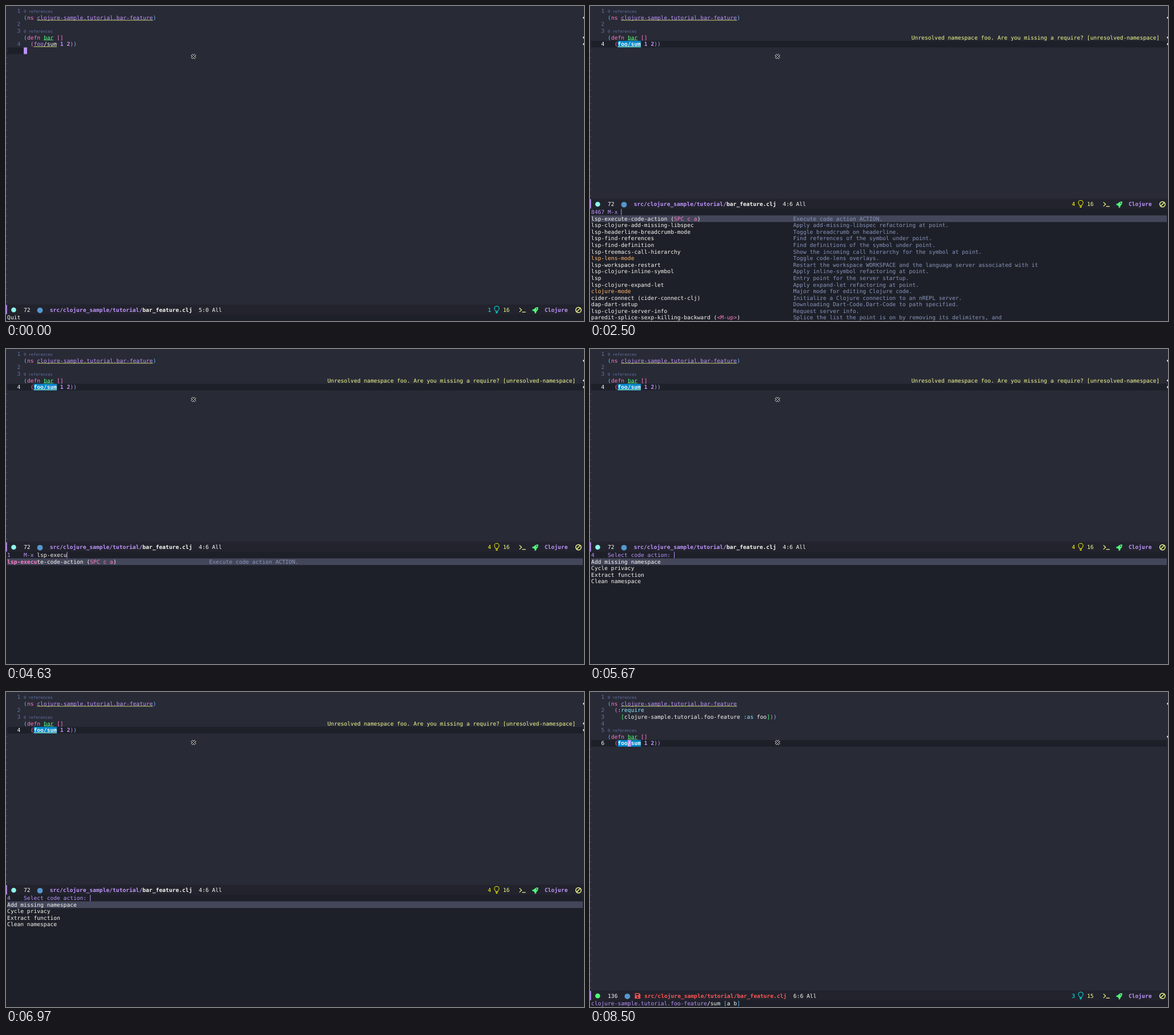
Animation, 1012 px wide and 553 px high, one loop 9060 ms. Source, as an HTML page:

```html
<!DOCTYPE html>
<html lang="en">
<head>
<meta charset="utf-8">
<title>Editor code action</title>
<style>
  html, body { margin: 0; width: 100%; height: 100%; overflow: hidden; background: #282a36; }
  svg { display: block; width: 1012px; height: 553px; }
  text {
    font: 9.63px "DejaVu Sans Mono", monospace;
    white-space: pre;
    text-rendering: geometricPrecision;
    font-variant-ligatures: none;
  }
  .bold { font-weight: bold; }
  .lens { font-size: 7.004px; }
</style>
</head>
<body>
<svg id="stage" viewBox="0 0 1012 553"></svg>
<script>
const LOOP = 9060, CW = 5.798, LH = 11.596, LEFT = 2.1, BASE = 8.96;
const BAR_H = 17.4, MINI = 356;

// One letter per colour; the upper-case letter is the bold version.
const INK = {
  w: '#f8f8f2', v: '#bd93f9', k: '#ff79c6', g: '#50fa7b', c: '#8be9fd', b: '#61bfff',
  y: '#f1fa8c', o: '#ffb86c', r: '#ff5555', d: '#8995bb', n: '#6272a4'
};
const DARK = '#1e2029', SELECT = '#44475a';

const colX = col => LEFT + col * CW;
const rowY = row => 3.16 + row * LH;
const miniY = row => MINI + row * LH;
const safe = s => s.replace(/&/g, '&amp;').replace(/</g, '&lt;');
const rect = (x, y, w, h, fill) => `<rect x="${x}" y="${y}" width="${w}" height="${h}" fill="${fill}"/>`;
const disc = (x, y, r, fill) => `<circle cx="${x}" cy="${y}" r="${r}" fill="${fill}"/>`;
const stroke = (d, color, w = 1) => `<path d="${d}" fill="none" stroke="${color}" stroke-width="${w}"/>`;
const label = (x, y, s, fill, cls = '') => `<text x="${x}" y="${y}" fill="${fill}" class="${cls}">${safe(s)}</text>`;

// Runs alternate between an ink letter and its text.
function runs(x, y, ...parts) {
  let out = '';
  for (let i = 0; i < parts.length; i += 2) {
    const [ink, s] = [parts[i], parts[i + 1]];
    const low = ink.toLowerCase();
    out += label(x, y, s, INK[low], ink === low ? '' : 'bold');
    x += s.length * CW;
  }
  return out;
}
const code = (row, ...parts) => runs(colX(5), rowY(row) + BASE, ...parts);
const underline = (row, col, n, ink) => rect(colX(col + 5), rowY(row) + BASE + 0.9, n * CW, 0.8, INK[ink]);
const lens = row => label(colX(5), rowY(row) + BASE, '0 references', INK.n, 'lens');

function buffer(s) {
  const last = s.edited ? 7 : 5, defn = last - 1;
  const [row, col] = s.cursor;
  const y = rowY(row);
  const end = s.list ? 28 : 44;
  let out = rect(LEFT, y, s.idle ? 1008 : 5 * CW, LH, DARK);

  if (s.idle) out += rect(colX(8), rowY(last), 7 * CW, LH, '#0189cc');
  if (!s.list) out += rect(colX(col + 5), y, CW, LH, INK.v);

  for (let r = last + 1; r <= end; r++) out += rect(0, rowY(r) + 5.3, 2.1, 0.8, '#565761');

  const numbered = s.edited ? [0, 2, 3, 4, 5, 7] : [0, 2, 3, 5];
  numbered.forEach((r, i) => {
    out += runs(colX(3), rowY(r) + BASE, r === row ? 'w' : 'n', String(i + 1));
  });

  out += lens(0) + lens(defn - 1);
  out += code(1, 'b', '(', 'k', 'ns ', 'v', 'clojure-sample.tutorial.bar-feature', 'b', s.edited ? '' : ')');
  out += underline(1, 4, 35, 'y');
  if (s.edited) {
    out += s.plain
      ? code(2, 'w', '  (:require') + code(3, 'w', '    [clojure-sample.tutorial.foo-feature :as foo]))')
      : code(2, 'k', '  (', 'c', ':require') +
        code(3, 'g', '    [', 'w', 'clojure-sample.tutorial.foo-feature ', 'c', ':as', 'w', ' foo', 'g', ']', 'k', ')', 'b', ')');
  }
  out += code(defn, 'b', '(', 'k', 'defn ', 'g', 'bar', 'k', ' []') + underline(defn, 6, 3, 'g');
  const call = s.idle ? ['W', 'foo/sum'] : ['v', 'foo', 'w', '/sum'];
  out += code(last, 'k', '  (', ...call, 'V', ' 1 2', 'k', ')', 'b', ')');

  const unresolved = !s.edited || s.plain;
  if (unresolved) out += underline(last, 3, 7, 'y');
  if (unresolved && s.idle) {
    out += runs(562.8, rowY(defn) + BASE, 'y', 'Unresolved namespace foo. Are you missing a require? [unresolved-namespace]');
  }
  for (const r of [1, defn, ...(unresolved ? [last] : [])]) {
    const m = rowY(r) + 5.8;
    out += `<path d="M1012 ${m - 2.4}L1009.8 ${m}L1012 ${m + 2.4}z" fill="#f8f9c8"/>`;
  }
  return out;
}

function pointer() {
  const cross = 'M324.9 85.2L331.7 92M331.7 85.2L324.9 92';
  return stroke(cross, '#f8f8f2', 3.4) + stroke(cross, '#15161c', 1.9);
}

function modeline(s) {
  const top = (s.list ? MINI : miniY(16)) - BAR_H;
  const y = top + 12.8, mid = top + 9.4;
  const saved = s.edited && !s.plain;
  const few = saved || !s.idle && !s.plain;
  const tone = few ? '#00ffff' : '#ffff00';
  const count = saved ? '3' : few ? '1' : '4';
  const shift = saved ? 18.5 : 0;

  let out = rect(0, top, 1012, 553 - top, DARK) + rect(0, top, 1012, BAR_H, '#22232d');
  out += rect(0, top + 0.6, 1.7, BAR_H - 1, INK.v);
  out += disc(13.5, mid, 4.3, saved ? INK.g : '#8ff5ea');
  out += runs(colX(5), y, 'w', saved ? '136' : '72');
  out += disc(saved ? 65.4 : 59.5, mid + 0.8, 4.9, '#5597cf');
  if (saved) {
    out += `<path d="M78.6 ${mid - 4.7}h7.6l2 2v7.4h-9.6z" fill="${INK.r}"/>`;
    out += rect(80, mid - 3.5, 5.2, 2.5, '#22232d') + disc(83.3, mid + 2, 1.5, '#22232d');
  }
  const name = saved ? ['R', 'src/clojure_sample/tutorial/bar_feature.clj']
                     : ['V', 'src/clojure_sample/tutorial/', 'W', 'bar_feature.clj'];
  out += runs(76.7 + shift, y, ...name, 'w', `  ${s.cursor[0] - 1 - (s.edited ? 0 : s.cursor[0] === 6 ? 0 : 0)}:${s.cursor[1]} All`);

  out += label(843.6, y, count, tone);
  out += stroke(`M857.3 ${mid + 2.3}c0-2-2.2-2.4-2.2-4.9a4.1 4.1 0 0 1 8.2 0c0 2.500-2.200 2.900-2.200 4.900zM857.4 ${mid + 4}h3.600M857.800 ${mid + 5.400}h2.800`, tone);
  out += runs(870.2, y, 'y', saved ? '15' : '16');
  out += stroke(`M898.9 ${mid - 3.6}l3.8 3.6l-3.8 3.6M903.6 ${mid + 3.8}h6.3`, '#f1fa8c', 1.2);
  out += `<path d="M931.8 ${mid - 4.8}c-4-.3-6 1.500-7.300 3.400l-2.500.5l-.9 2.500l2.300-.1l2.400 2.400l-.1 2.500l2.500-1l.6-2.600c2-1.400 3.400-3.700 3-7.600z" fill="${INK.g}"/>`;
  out += disc(929, mid - 2, 0.9, '#22232d');
  out += runs(942.9, y, 'V', 'Clojure');
  out += `<circle cx="1002.3" cy="${mid + 0.1}" r="4.700" fill="none" stroke="${INK.y}" stroke-width="1.500"/>`;
  out += stroke(`M999 ${mid + 3.4}l6.600-6.600`, INK.y, 1.5);
  return out;
}

const EXEC = ['lsp-execute-code-action (SPC c a)', 'Execute code action ACTION.'];
const EXPAND = ['lsp-clojure-expand-let', 'Apply expand-let refactoring at point.'];
const SERVER = ['lsp-clojure-server-info', 'Request server info.'];
const COMMON = [
  EXEC,
  ['lsp-clojure-add-missing-libspec', 'Apply add-missing-libspec refactoring at point.'],
  ['lsp-headerline-breadcrumb-mode', 'Toggle breadcrumb on headerline.'],
  ['lsp-find-references', 'Find references of the symbol under point.'],
  ['lsp-find-definition', 'Find definitions of the symbol under point.'],
  ['lsp-treemacs-call-hierarchy', 'Show the incoming call hierarchy for the symbol at point.'],
  ['lsp-lens-mode', 'Toggle code-lens overlays.'],
  ['lsp-workspace-restart', 'Restart the workspace WORKSPACE and the language server associated with it'],
  ['lsp-clojure-inline-symbol', 'Apply inline-symbol refactoring at point.'],
  ['lsp', 'Entry point for the server startup.'],
  EXPAND
];
const ALL = [
  ...COMMON,
  ['clojure-mode', 'Major mode for editing Clojure code.'],
  ['cider-connect (cider-connect-clj)', 'Initialize a Clojure connection to an nREPL server.'],
  ['dap-dart-setup', 'Downloading Dart-Code.Dart-Code to path specified.'],
  SERVER,
  ['paredit-splice-sexp-killing-backward (<M-up>)', 'Splice the list the point is on by removing its delimiters, and']
];
const LSP = [
  ...COMMON,
  SERVER,
  ['lsp-clojure-clean-ns', 'Apply clean-ns refactoring at point.'],
  ['lsp-rename', 'Rename the symbol (i.e. point) under point to NEWNAME in the workspace.'],
  ['lsp-describe-session', 'Describes current session.'],
  ['lsp-disconnect', 'Disconnect the buffer from the language server.']
];
const EXTEND = [
  EXEC,
  EXPAND,
  ['lsp-clojure-extract-function', 'Apply extract-function refactoring at point.'],
  ['lsp-extend-selection', 'Extend selection.'],
  ['lsp-clojure-cursor-info', 'Request the extra cursor info for the symbol under the point.'.slice(0, 59)]
];
const ACTIONS = ['Add missing namespace', 'Cycle privacy', 'Extract function', 'Clean namespace'].map(a => [a]);

// Splits a command into matched prefix, plain text and key binding.
function candidate([name, doc], y, typed) {
  const hit = typed && name.startsWith(typed) ? typed.length : typed ? Math.min(3, typed.length) : 0;
  const key = name.match(/\((SPC c a|<M-up>)\)/);
  const cut = key ? key.index + 1 : name.length;
  const ink = name.endsWith('-mode') && !name.includes('breadcrumb') ? 'o' : 'w';
  const parts = ['K', name.slice(0, hit), ink, name.slice(hit, cut)];
  if (key) parts.push('k', key[1], 'w', ')');
  return runs(LEFT, y, ...parts) + (doc ? runs(colX(61), y, 'd', doc) : '');
}

function minibuffer(s) {
  if (!s.list) return runs(LEFT, miniY(16) + BASE, ...(s.echo || []));
  const typed = s.typed || '';
  const prompt = s.count.padEnd(5) + (s.prompt || 'M-x ');
  let out = runs(LEFT, MINI + BASE, 'v', prompt, 'w', typed);
  out += rect(colX(prompt.length + typed.length), MINI + 0.2, 1, LH - 0.4, INK.v);
  out += rect(LEFT, miniY(1 + (s.pick || 0)), 1008, LH, SELECT);
  s.list.forEach((item, i) => { out += candidate(item, miniY(i + 1) + BASE, typed); });
  return out;
}

const idle = { cursor: [5, 6], idle: true };
const mx = (count, typed, list) => ({ ...idle, count, typed, list });
const pick = i => ({ ...idle, count: '4', prompt: 'Select code action: ', list: ACTIONS, pick: i });
const done = { cursor: [7, 6], edited: true, idle: true };
const scenes = [
  [0, { cursor: [6, 0], echo: ['w', 'Quit'] }],
  [570, { cursor: [5, 0] }],
  [800, { cursor: [5, 1] }],
  [1000, { cursor: [5, 3] }],
  [1070, { cursor: [5, 6] }],
  [2030, { ...idle, echo: ['w', 'SPC-'] }],
  [2500, mx('8467', '', ALL)],
  [3030, mx('382', 'lsp', LSP)],
  [3570, mx('5', 'lsp-ex', EXTEND)],
  [4100, mx('1', 'lsp-exec', [EXEC])],
  [4630, mx('1', 'lsp-execu', [EXEC])],
  [5670, pick(0)],
  [6200, pick(1)],
  [6970, pick(0)],
  [7430, { cursor: [7, 6], edited: true, plain: true }],
  [7930, done],
  [8500, { ...done, echo: ['v', 'clojure-sample.tutorial.foo-feature', 'w', '/sum ', 'b', '[', 'w', 'a b', 'b', ']'] }]
];

const stage = document.getElementById('stage');
let shown = null;
function tick() {
  const t = performance.now() % LOOP;
  const scene = scenes.filter(([at]) => at <= t).pop()[1];
  if (scene !== shown) {
    shown = scene;
    stage.innerHTML = rect(0, 0, 1012, 553, '#282a36') +
      buffer(scene) + pointer() + modeline(scene) + minibuffer(scene);
  }
  requestAnimationFrame(tick);
}
tick();
</script>
</body>
</html>
```
